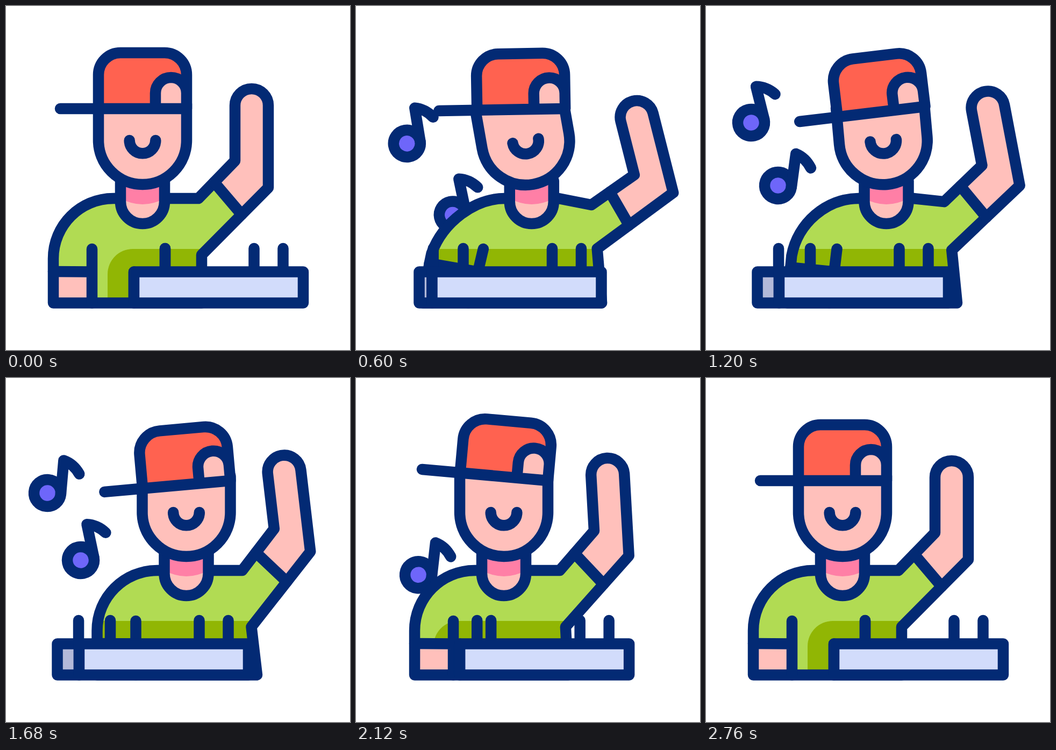
Write an HTML page that moves like this. It is 640 px wide and 640 px high and loops after 2800 ms.

```html
<!DOCTYPE html>
<html lang="en">
<head>
<meta charset="utf-8">
<title>DJ at the decks</title>
<style>
  html, body { margin: 0; width: 100%; height: 100%; overflow: hidden; background: #fff; }
  svg { display: block; width: 100vw; height: 100vh; }
  .line { fill: none; stroke: #032a74; stroke-width: 20.5; stroke-linecap: round; stroke-linejoin: round; }
  .skin { fill: #ffc0bb; }
  .shirt { fill: #b1db53; }
  .shade { fill: #91b604; }
  .cap { fill: #ff6250; }
  .neck { fill: #ff7fa6; }
  .line.note { fill: #6e66fa; }
  .desk { fill: #d2dcfb; }
  .side { fill: #b3b9d9; }
</style>
</head>
<body>
<svg viewBox="0 0 640 640">
  <defs>
    <clipPath id="torsoClip"><path id="clipShape"/></clipPath>
    <g id="noteShape">
      <circle class="line note" r="25"/>
      <path class="line" d="M25 0V-63Q44 -58 56 -40.5"/>
    </g>
  </defs>

  <use id="noteA" href="#noteShape"/>
  <use id="noteB" href="#noteShape"/>

  <g id="body">
    <path id="torso" class="shirt"/>
    <g clip-path="url(#torsoClip)">
      <path id="shade" class="shade" d="M189 560V499A47 47 0 0 1 236 452H700V560Z"/>
    </g>
    <path id="foreArm" class="skin"/>
    <path id="restArm" class="skin"/>
    <path id="outline" class="line"/>
    <path id="seams" class="line"/>
    <path class="skin" d="M213 310V364A41 41 0 0 0 295 364V310Z"/>
    <path class="neck" d="M213 310V358Q254 380 295 358V310Z"/>
    <path class="line" d="M213 325V364A41 41 0 0 0 295 364V325"/>
    <g id="face">
      <path class="skin" d="M172 178V250A82 82 0 0 0 336 250V178Z"/>
      <path class="line" d="M172 182V250A82 82 0 0 0 336 250V182M229.7 250A24.3 24.3 0 0 0 278.3 250"/>
    </g>
    <g id="cap">
      <path class="cap" d="M172 191V128A41 41 0 0 1 213 87H295A41 41 0 0 1 336 128V191Z"/>
      <path class="skin" d="M278 191V162A29 29 0 0 1 336 162V191Z"/>
      <path class="line" d="M172 191V128A41 41 0 0 1 213 87H295A41 41 0 0 1 336 128V191M278 191V162A29 29 0 0 1 336 162M101 191H336"/>
    </g>
  </g>

  <path id="backKnob" class="line" d="M296 451V494"/>
  <path id="sideFill" class="side"/>
  <path id="sideLine" class="line"/>
  <g id="desk">
    <path class="desk" d="M238 494.5H553V552.5H238Z"/>
    <path class="line" d="M238 494.5H553V552.5H238ZM296 451V494M461.5 451V494M515.5 451V494"/>
  </g>
</svg>

<script>
const LOOP = 2800, STEP = 40, RAD = Math.PI / 180;
const $ = id => document.getElementById(id);
const clamp = v => Math.min(1, Math.max(0, v));
const set = (id, d) => $(id).setAttribute('d', d);
const move = (id, v) => $(id).setAttribute('transform', v);
const pt = p => p[0].toFixed(2) + ' ' + p[1].toFixed(2);
const poly = (...p) => 'M' + p.map(pt).join('L');
const lerp = (a, b, k) => a + (b - a) * k;
const mix = (a, b, k) => [lerp(a[0], b[0], k), lerp(a[1], b[1], k)];
const add = (a, b) => [a[0] + b[0], a[1] + b[1]];
const spin = (x, y, deg) => {
  const c = Math.cos(deg * RAD), s = Math.sin(deg * RAD);
  return [x * c - y * s, x * s + y * c];
};

const easeOut = u => 1 - Math.pow(1 - clamp(u), 2.44);
const easeInOut = u => (u = clamp(u)) < .5 ? 4 * u ** 3 : 1 - 4 * (1 - u) ** 3;
const pulse = (t, from, to) => Math.sin(Math.PI * clamp((t - from) / (to - from))) ** 2;
// Rises at one time, falls at another
const trip = (ease, t, out, back, span, backSpan = span) =>
  ease((t - out) / span) - ease((t - back) / backSpan);

// Smooth steps between a few [time, angle] keys
function swing(t, ...keys) {
  const i = keys.findIndex(k => k[0] > t);
  if (i < 0) return keys[keys.length - 1][1];
  const [t0, a] = keys[i - 1], [t1, b] = keys[i];
  const u = (t - t0) / (t1 - t0);
  return lerp(a, b, u * u * (3 - 2 * u));
}

function drawNote(id, t, home, perch, drift, kx, ky, angle) {
  const spot = mix(perch, add(perch, drift), easeInOut((t - 1200) / 480));
  const at = [lerp(home[0], spot[0], kx), lerp(home[1], spot[1], ky)];
  move(id, `translate(${pt(at)}) rotate(${angle})`);
}

function drawNotes(t) {
  const ax = trip(easeInOut, t, 98, 1740, 670, 1000);
  const ay = trip(easeInOut, t, -76, 1740, 1043, 671);
  const tilt = swing(t, [0, 20], [360, 20], [640, -11], [1200, -14], [1680, 5], [2120, 6.5], [LOOP, 20]);
  drawNote('noteA', t, [255, 440], [84, 217], [-7, -3], ax, ay, tilt);

  const k = trip(easeInOut, t, 240, 1700, 700);
  const rock = -2 - 10 * Math.cos(2 * Math.PI * (t - 620) / 1080);
  drawNote('noteB', t, [234, 453], [134, 334], [5, 5], k, k, rock);
}

function drawBody(shift, p, s, turn, deskX) {
  const lean = -10 * s;

  // Raised arm: upper part turns at the shoulder, forearm at the elbow
  const shoulder = [358 + 7 * s, 358 + 12 * s];
  const elbow = add(shoulder, spin(68, -70, turn + 17 * s));
  const fore = (x, y) => add(elbow, spin(x, y, turn - 8 * s));
  const outer = fore(62, 50);
  const armpit = [364 + 11 * p + 1.5 * s, 463 - 11.5 * Math.pow(s, .4)];
  const hip = [364 + 21.5 * p, 552.5];
  const cuffIn = mix(shoulder, elbow, .43);
  const cuffOut = mix(armpit, outer, .6 - .18 * s);
  const hand = `L${pt(fore(0, -103))}A31 31 0 0 1 ${pt(fore(62, -103))}L${pt(outer)}`;

  // Resting arm
  const low = [88 + 3.6 * lean, 552.5];
  const cuffL = [88 + 2.4 * lean, 494 + 1.5 * lean];
  const cuffR = [160 + .6 * lean, 494.5];
  const top = [160 - .4 * lean, 452];
  const base = [160 + 2.4 * lean, 552.5];
  const side = [88 + 2 * lean, 470 + lean];
  const ctrl = add(side, spin(0, -62, -2 * lean));
  const back = `${poly(low, cuffL, side)}C${pt(ctrl)} ${138 - lean} 358 ${200 - .4 * lean} 358H304L${pt(shoulder)}L${pt(elbow)}`;
  const front = `L${pt(armpit)}L${pt(hip)}Z`;

  const torso = `${back}L${pt(outer)}${front}`;
  set('torso', torso);
  set('clipShape', torso);
  set('foreArm', `${poly(cuffIn, elbow)}${hand}L${pt(cuffOut)}Z`);
  set('restArm', poly(cuffL, cuffR, base, low) + 'Z');
  set('outline', back + hand + front);
  set('seams', poly(cuffIn, cuffOut) + poly(cuffL, cuffR) + poly(top, cuffR, base));
  move('shade', `translate(${deskX - shift} 0)`);
  move('body', `translate(${shift} 0)`);
}

function drawHead(t, s) {
  const nod = swing(t, [0, 0], [360, -1.5], [600, -1], [1200, -6.85], [1680, -5.1], [2140, 5.2], [2720, 0]);
  const dip = -4 * Math.sin(Math.PI * clamp(s));
  move('face', `rotate(${-10 * s} 254 315)`);
  move('cap', `translate(${-19.5 * s} ${dip}) rotate(${nod} 336 191)`);
}

function drawDesk(x, p) {
  const width = 40.5 * Math.pow(p, 9.5), edge = 238 + x;
  const box = `M${edge} 494.5H${edge - width}V552.5H${edge}Z`;
  move('desk', `translate(${x} 0)`);
  move('backKnob', `translate(${x * 1.578} 0)`);
  set('sideFill', box);
  set('sideLine', box);
}

function render(time) {
  const t = Math.floor((time % LOOP) / STEP) * STEP;
  const shift = 81.5 * trip(easeOut, t, 0, 1694, 1000);
  const p = trip(easeInOut, t, 0, 1710, 787);
  const turn = -6.7 * trip(easeInOut, t, 70, 1755, 720);
  const s = 1.12 * pulse(t, 220, 1180) + 1.02 * pulse(t, 1040, 1680);
  const deskX = -102 * p;
  drawBody(shift, p, s, turn, deskX);
  drawHead(t, s);
  drawDesk(deskX, p);
  drawNotes(t);
}

let start;
function tick(now) {
  if (start === undefined) start = now;
  render(now - start);
  requestAnimationFrame(tick);
}
render(0);
requestAnimationFrame(tick);
</script>
</body>
</html>
```
